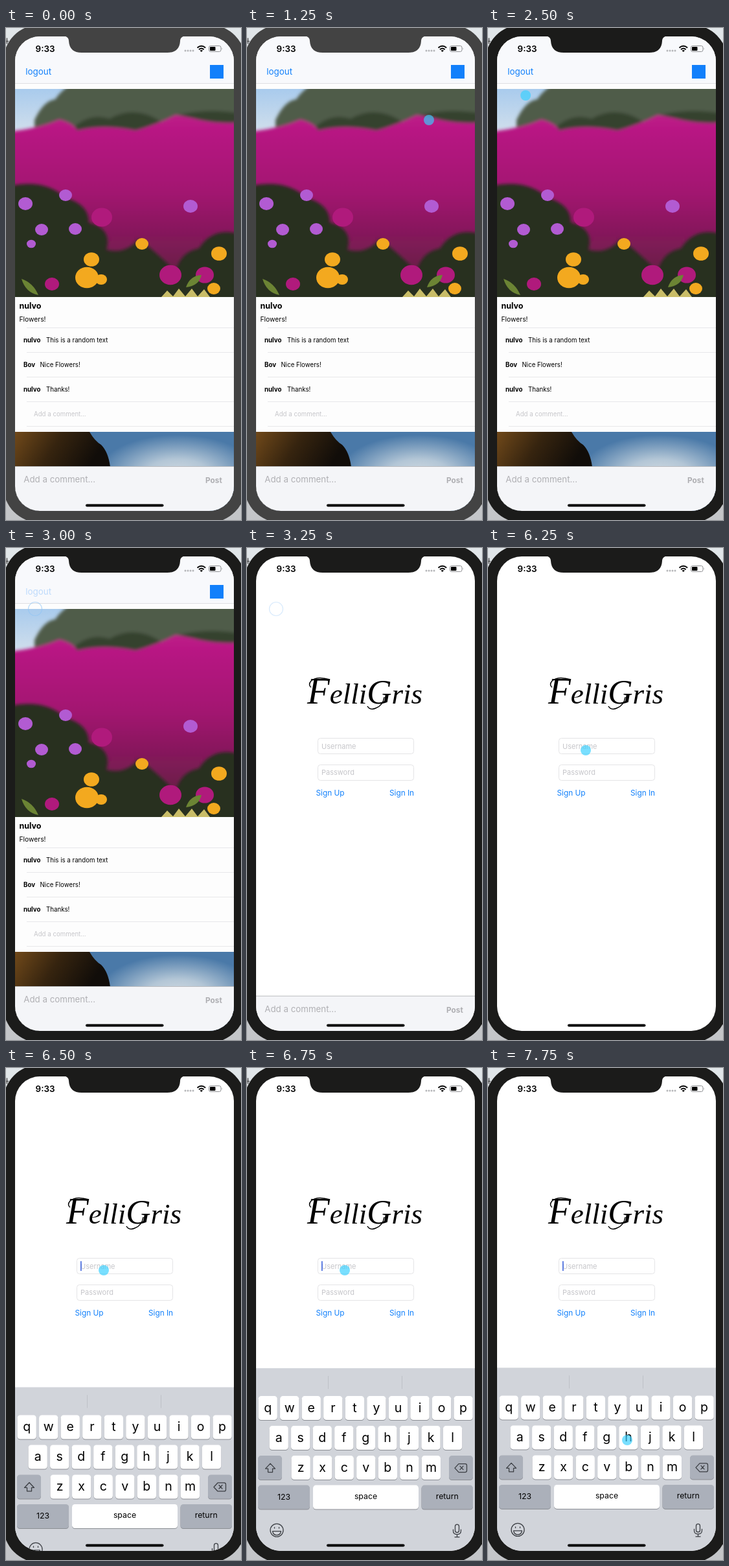
Animation of 363 by 759 pixels, one loop 8000 ms. Source, as an HTML page:

```html
<!DOCTYPE html>
<html lang="en">
<head>
<meta charset="utf-8">
<title>Photo feed and sign in</title>
<style>
  html, body { margin: 0; width: 100%; height: 100%; overflow: hidden; }
  svg { display: block; width: 100%; height: 100%; font-family: Inter, Roboto, sans-serif; }
  .bold { font-weight: 700; }
  .link { fill: #1280fb; }
  .hint { fill: #c6c6ca; }
  .mid { text-anchor: middle; }
  .line { fill: none; stroke: #3c3f44; stroke-width: 1.3; stroke-linecap: round; stroke-linejoin: round; }
  .small { font-size: 9.7px; }
  .logo { font: italic 45px "Liberation Serif", serif; }
</style>
</head>
<body>
<svg viewBox="0 0 363 759">
  <defs>
    <linearGradient id="desk" x2="0" y2="1">
      <stop stop-color="#e1e6e9"/><stop offset="1" stop-color="#c3c5c8"/>
    </linearGradient>
    <linearGradient id="daylight" x2="0" y2="1">
      <stop stop-color="#a9cbed"/><stop offset="1" stop-color="#d3e0ec"/>
    </linearGradient>
    <linearGradient id="blossom" x2="0" y2="1">
      <stop stop-color="#bd1a88"/><stop offset=".5" stop-color="#a21670"/><stop offset="1" stop-color="#6a1c48"/>
    </linearGradient>
    <radialGradient id="dusk" gradientUnits="userSpaceOnUse" cx="265" cy="690" r="125" gradientTransform="translate(0 345) scale(1 .5)">
      <stop stop-color="#d3dce3"/><stop offset=".4" stop-color="#b3c6d6"/><stop offset="1" stop-color="#4a79a8"/>
    </radialGradient>
    <linearGradient id="rock" gradientUnits="userSpaceOnUse" x1="14" y1="623" x2="120" y2="690">
      <stop stop-color="#70491a"/><stop offset=".5" stop-color="#36240f"/><stop offset="1" stop-color="#110d09"/>
    </linearGradient>
    <filter id="soft"><feGaussianBlur stdDeviation="2.5"/></filter>
    <clipPath id="screen"><rect x="14" y="13" width="338" height="732" rx="38"/></clipPath>
    <clipPath id="photo"><rect x="14" y="94" width="338" height="321"/></clipPath>
  </defs>

  <rect width="363" height="759" fill="url(#desk)"/>
  <path d="M0 20.500h4M1.500 15.500v9" stroke="#555" stroke-width="1.500"/>
  <rect id="bezel" x="-4" y="-5" width="374" height="768" rx="56"/>

  <g clip-path="url(#screen)">
    <rect x="14" y="13" width="338" height="732" fill="#fff"/>

    <g id="feed">
      <rect x="14" y="85" width="338" height="660" fill="#fdfdfd"/>
      <rect x="14" y="13" width="338" height="72" fill="#f8f9fc"/>
      <path d="M14 85.500h338" stroke="#dedfe2"/>
      <text id="logout" class="link" x="30.300" y="72" font-size="13.400">logout</text>
      <rect x="315" y="57" width="21" height="21" fill="#1280fb"/>
      <g clip-path="url(#photo)">
        <rect x="14" y="94" width="338" height="321" fill="#28301f"/>
        <rect x="14" y="94" width="338" height="70" fill="url(#daylight)"/>
        <g filter="url(#soft)">
          <path d="M44 170V142Q58 112 76 110Q85 96 105 84H362V170Z" fill="#4f5b48"/>
          <path d="M90 170Q120 128 160 140Q200 118 240 145Q290 120 362 132V190H90Z" fill="#36422f"/>
          <path d="M4 160Q50 155 82 141Q104 146 110 158Q150 148 200 158Q230 150 262 134Q285 138 300 142Q330 148 362 146V318
            Q320 306 298 340Q270 345 262 375Q225 340 205 325Q185 350 155 342Q165 310 128 300Q128 272 92 262Q60 232 4 244Z" fill="url(#blossom)"/>
        </g>
        <g id="flowers"></g>
        <path d="M240 415l9-10 9 9 9-12 10 12 10-12 9 12 10-11 9 12Z" fill="#c9bd68"/>
        <path d="M24 387Q42 393 50 412Q30 408 24 387M278 400Q284 382 302 381Q298 398 278 400" fill="#6c8434"/>
      </g>
      <text class="bold" x="20.500" y="433" font-size="12.500">nulvo</text>
      <text x="20.500" y="453" font-size="10.300">Flowers!</text>
      <g class="small">
        <text class="bold" x="27" y="485">nulvo</text><text x="62" y="485">This is a random text</text>
        <text class="bold" x="27" y="523">Bov</text><text x="52.500" y="523">Nice Flowers!</text>
        <text class="bold" x="27" y="561">nulvo</text><text x="62" y="561">Thanks!</text>
        <text class="hint" x="43" y="599">Add a comment...</text>
      </g>
      <path d="M32 462.500h320M32 500.500h320M32 538.500h320M32 576.500h320M32 614.500h320" stroke="#e8e8ea"/>
      <rect x="14" y="623" width="338" height="122" fill="url(#dusk)"/>
      <path d="M14 623H129Q137 637 147 643Q158 654 161 677V745H14Z" fill="url(#rock)"/>
    </g>

    <g id="login">
      <text class="logo" x="93" y="240"><tspan font-size="57">F</tspan>elli<tspan font-size="53">G</tspan>ris</text>
      <path d="M128 203Q108 197 99 205Q94 211 99 215M186 244Q190 251 199 247Q210 243 212 230" fill="none" stroke="#000" stroke-width="1.500"/>
      <g fill="#fff" stroke="#e4e4e6">
        <rect x="109.500" y="293.500" width="148" height="24" rx="4"/>
        <rect x="109.500" y="334.500" width="148" height="24" rx="4"/>
      </g>
      <g class="hint" font-size="11"><text x="115" y="309.500">Username</text><text x="115" y="350">Password</text></g>
      <g class="link" font-size="11.800"><text x="106.500" y="382">Sign Up</text><text x="220" y="382">Sign In</text></g>
      <rect id="caret" x="115" y="298" width="1.700" height="15" fill="#4a6ee0"/>
    </g>

    <g id="bar">
      <rect x="14" y="677" width="338" height="82" fill="#f4f5f8"/>
      <path d="M14 676.500h338" stroke="#b9babd"/>
      <text x="27.300" y="701" font-size="13.300" fill="#b0b0b4">Add a comment...</text>
      <text class="bold" x="308" y="702" font-size="11.800" fill="#aeaeb2">Post</text>
    </g>

    <g id="keyboard">
      <rect x="14" y="463" width="338" height="290" fill="#d1d4da"/>
      <path d="M125.500 475v20M239.500 475v20" stroke="#bec1c7"/>
      <g id="keys"></g>
      <path class="line" d="M36 610l-7.500 8h4v5.500h7v-5.500h4Z"/>
      <path class="line" d="M321 617l6-6.500h10q2.500 0 2.500 2.500v8q0 2.500-2.500 2.500h-10ZM329 614l5 5.500M334 614l-5 5.500"/>
      <g class="line">
        <circle cx="46" cy="713" r="10"/>
        <path d="M39.500 714.500h13q-1 6-6.500 6t-6.500-6ZM42.500 708.500v1.500M49.500 708.500v1.500"/>
        <rect x="321.500" y="704" width="6" height="12.500" rx="3"/>
        <path d="M318.500 712v2q0 5.500 6 5.500t6-5.500v-2M324.500 719.500v4M321 723.500h7"/>
      </g>
    </g>

    <path d="M88 12Q97 13 97 20Q98 38 117 38H249Q268 38 269 20Q269 13 278 12Z" id="notch"/>
    <text class="mid" x="60.500" y="36.800" font-size="13.400" font-weight="600">9:33</text>
    <g fill="#b5b6b9">
      <circle cx="277" cy="35" r="1.500"/><circle cx="281" cy="35" r="1.500"/>
      <circle cx="285" cy="35" r="1.500"/><circle cx="289" cy="35" r="1.500"/>
    </g>
    <path d="M295.500 30.500q6.300-5.500 12.600 0M298 33.200q3.800-3.300 7.600 0" fill="none" stroke="#000" stroke-width="2"/>
    <path d="M299.500 34.800q2.300-1.800 4.600 0l-2.300 2.300Z"/>
    <rect x="313.500" y="27.500" width="18.500" height="9" rx="2.600" fill="none" stroke="#8e8f92"/>
    <rect x="315" y="29" width="8.500" height="6" rx="1"/>
    <path d="M333.500 30.500q1.500 1.500 0 3Z" fill="#8e8f92"/>
    <rect x="123" y="734.500" width="120.500" height="4" rx="2"/>
  </g>

  <circle id="cursor" r="8" fill="#37cfff" fill-opacity=".67"/>
  <circle id="ring" cx="45" cy="94" r="10.500" fill="none" stroke="#8fc4f5" stroke-width="1.200"/>
</svg>
<script>
const LOOP = 8000, STEP = 250;
const el = id => document.getElementById(id);
const show = (id, on) => el(id).style.display = on ? '' : 'none';

// Main colour patches of the photograph: fill, then x, y, radius.
const patches = [
  ['#b25bd2', 30, 271, 11], ['#b25bd2', 92, 258, 10], ['#b25bd2', 55, 311, 10],
  ['#b25bd2', 39, 333, 7], ['#b25bd2', 107, 310, 10], ['#b25bd2', 285, 275, 11],
  ['#b01a7c', 148, 292, 16], ['#b01a7c', 71, 395, 11], ['#b01a7c', 254, 381, 17], ['#b01a7c', 307, 381, 14],
  ['#f3a91f', 125, 385, 18], ['#f3a91f', 132, 357, 12], ['#f3a91f', 147, 388, 9],
  ['#f3a91f', 210, 333, 10], ['#f3a91f', 329, 348, 12], ['#f3a91f', 321, 402, 10]
];
el('flowers').innerHTML = patches
  .map(([fill, x, y, r]) => `<ellipse cx="${x}" cy="${y}" rx="${r}" ry="${r * 0.9}" fill="${fill}"/>`).join('');

const key = (label, x, y, width, fill, size, baseline) => `
  <rect x="${x}" y="${y + 1}" width="${width}" height="37" rx="4.500" fill="#8b8e94"/>
  <rect x="${x}" y="${y}" width="${width}" height="37" rx="4.500" fill="${fill}"/>
  <text class="mid" x="${x + width / 2}" y="${y + baseline}" font-size="${size}">${label}</text>`;
const letterRow = (letters, center, y) => [...letters]
  .map((letter, i) => key(letter, center + i * 33.55 - 14.5, y, 29.3, '#fff', 19.5, 24.5)).join('');
const GREY = '#abb0ba';
el('keys').innerHTML =
  letterRow('qwertyuiop', 32, 506) + letterRow('asdfghjkl', 49, 552) + letterRow('zxcvbnm', 83, 598) +
  key('', 17, 598, 37, GREY, 12, 0) + key('', 312, 598, 37, GREY, 12, 0) +
  key('123', 17, 643.5, 80, GREY, 12.3, 22.5) + key('space', 102, 643.5, 163, '#fff', 12.3, 21.5) +
  key('return', 269.5, 643.5, 79.5, GREY, 12.3, 21.5);

// Pointer stops: time, x, y.
const path = [
  [500, 303, 4], [1250, 281, 142], [1500, 171, 190], [2750, 45, 94], [3500, 45, 94],
  [5250, 144, 335], [5750, 151, 312], [6750, 151, 312], [7750, 215, 574], [LOOP, 215, 574]
];
const smooth = p => { p = Math.min(1, Math.max(0, p)); return p * p * (3 - 2 * p); };

function cursorAt(t) {
  const i = Math.max(1, path.findIndex(point => point[0] > t));
  const [t0, x0, y0] = path[i - 1], [t1, x1, y1] = path[i];
  const p = smooth((t - t0) / (t1 - t0));
  return [x0 + (x1 - x0) * p, y0 + (y1 - y0) * p];
}

function render(t) {
  const focused = t >= 1750, signedOut = t >= 3250;
  el('bezel').setAttribute('fill', focused ? '#1b1b1a' : '#434343');
  el('notch').setAttribute('fill', focused ? '#1b1b1a' : '#434343');
  show('feed', !signedOut);
  show('login', signedOut);
  el('logout').style.opacity = t >= 3000 ? 0.25 : 1;

  show('bar', t < 3750);
  el('bar').setAttribute('transform', `translate(0 ${68 * smooth((t - 3100) / 500)})`);

  show('caret', t >= 6500);
  show('keyboard', t >= 6500);
  el('keyboard').setAttribute('transform', `translate(0 ${282 * Math.exp((6350 - t) / 67) - 0.6})`);

  const clicked = t >= 3000 && t < 3500;
  show('ring', clicked);
  el('ring').style.opacity = signedOut ? 0.35 : 0.6;
  show('cursor', t >= 500 && !clicked);
  el('cursor').setAttribute('transform', `translate(${cursorAt(t)})`);
}

const start = performance.now();
function frame() {
  const t = (performance.now() - start) % LOOP;
  render(Math.floor(t / STEP) * STEP);
  requestAnimationFrame(frame);
}
frame();
</script>
</body>
</html>
```
